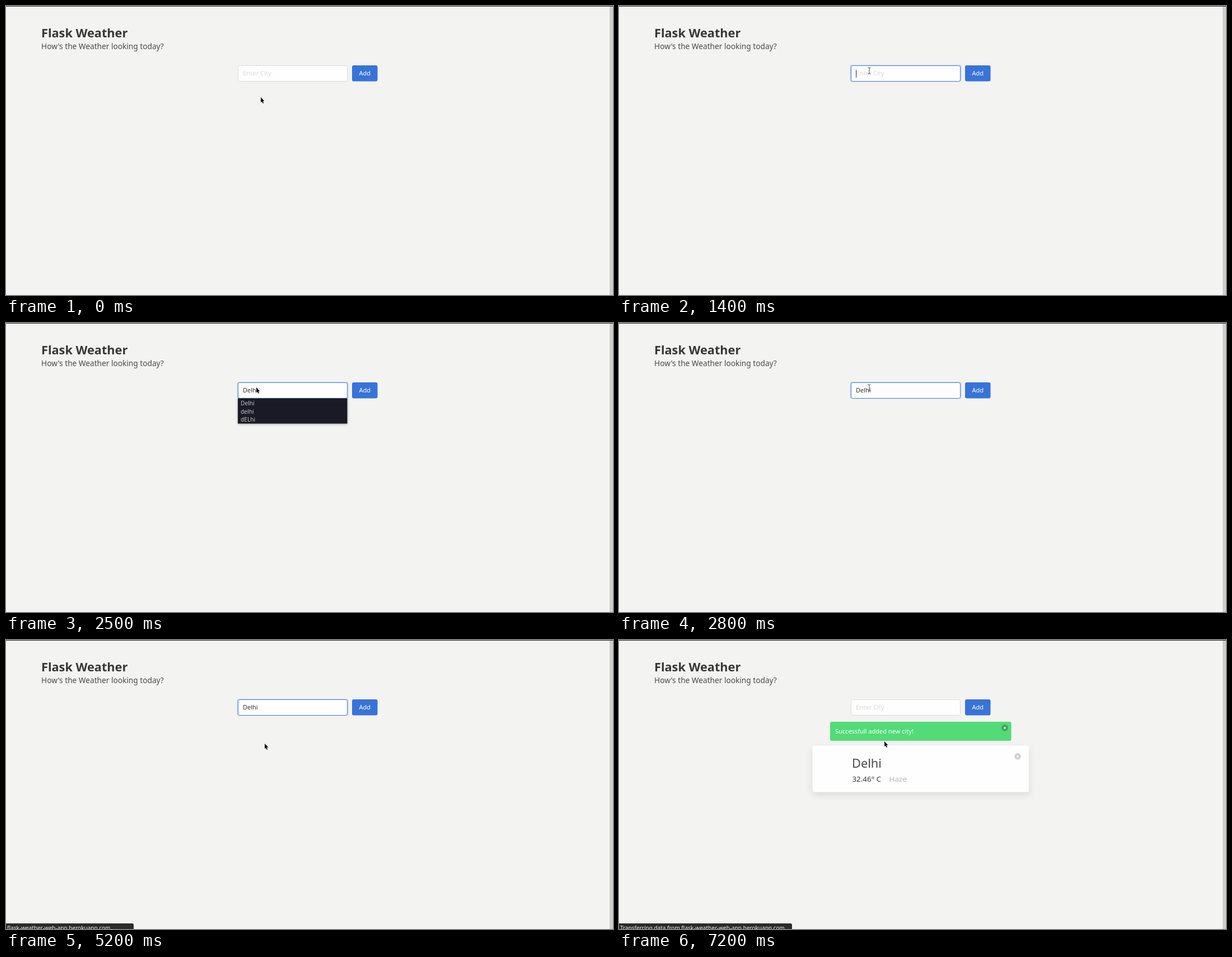
Recreate the animation shown at these times as an HTML page. Size 1084x516 px, loop 8 s.

```html
<!DOCTYPE html>
<html lang="en">
<head>
<meta charset="utf-8">
<title>Flask Weather</title>
<style>
  html, body { margin: 0; width: 100%; height: 100%; overflow: hidden; background: #f3f3f1; }
  svg { display: block; width: 100%; height: 100%; font: 11px "Noto Sans", "Open Sans", sans-serif; fill: #363636; }
  .muted { fill: #dadada; }
  .light { fill: #fff; }
  #menu { filter: drop-shadow(0 1px 2px rgba(0, 0, 0, .3)); }
  #menu text { font-size: 10.2px; fill: #c3c4c9; }
  #card { filter: drop-shadow(0 5px 6px rgba(10, 10, 10, .1)); }
  #status text { font-size: 10px; fill: #eee; }
</style>
</head>
<body>
<svg viewBox="0 0 1084 516">
  <defs>
    <g id="close">
      <circle r="5.7"/>
      <path d="M-1.9-1.9 1.9 1.9M1.9-1.9-1.9 1.9" stroke="#fff" stroke-width="1.3"/>
    </g>
  </defs>
  <rect width="1084" height="516" fill="#f3f3f1"/>
  <rect x="1078" width="6" height="516" fill="#cdcdcc"/>
  <rect width="1084" height="1" fill="#222"/>

  <text x="63" y="56" font-size="21.7" font-weight="700">Flask Weather</text>
  <text x="63" y="77" font-size="13.68" fill="#4a4a4a">How's the Weather looking today?</text>

  <rect id="ring" x="412.5" y="105" width="199" height="30.5" rx="4" fill="#3273dc" fill-opacity=".25"/>
  <rect id="field" x="414.5" y="106.5" width="195" height="28" rx="3" fill="#fefefe"/>
  <text id="hint" class="muted" x="423" y="124.3" font-size="11.2">Enter City</text>
  <text id="typed" x="423" y="124.3"></text>
  <rect id="caret" y="114" width="1" height="14"/>
  <rect x="618" y="106" width="45.5" height="28.5" rx="3" fill="#3873d7"/>
  <text class="light" x="630.5" y="124.3">Add</text>

  <g id="menu">
    <rect id="panel" x="414" y="134.5" width="195.5" fill="#191a25"/>
    <g id="items"></g>
  </g>

  <g id="result">
    <rect x="377" y="146" width="323.5" height="34" rx="3" fill="#52db76"/>
    <text class="light" x="386" y="167">Successfull added new city!</text>
    <use href="#close" x="689" y="157" fill="#3d9c57"/>
    <rect id="card" x="345.5" y="188.5" width="386.5" height="83" rx="4" fill="#fefefe"/>
    <use href="#close" x="712" y="208" fill="#cecece"/>
    <text x="416" y="228" font-size="21.8" fill="#4a4a4a">Delhi</text>
    <text x="416.5" y="252.5" font-size="13.3">32.46° C</text>
    <text x="482.5" y="252.5" font-size="13.4" fill="#b5b5b5">Haze</text>
  </g>

  <g id="status">
    <rect id="bar" x="-4" y="506" height="20" rx="3" fill="#2b2b2b"/>
    <text id="message" x="2" y="518"></text>
  </g>

  <path id="arrow" d="M0 0V9.3L2 7.6 3.6 11 5.2 10.3 3.8 7 6.3 6.6Z" fill="#111"/>
  <path id="beam" d="M-2.5-5H-.7L0-4.3.7-5H2.5M0-4.3V5.3M-2.5 6H-.7L0 5.3.7 6H2.5" fill="none" stroke="#444"/>
</svg>
<script>
const LOOP = 8000;
const CITY = "Delhi";
const HOST = "flask-weather-web-app.herokuapp.com";
const HISTORY = ["Delhi", "delhi", "dELhi", "Dlehi", "Mumbai", "Paris"];
// Pointer path: time, x, y
const PATH = [
  [0, 455, 163], [900, 455, 163], [1200, 447, 115], [3300, 447, 115], [3500, 441, 122],
  [3900, 459, 188], [4400, 459, 188], [4600, 459, 186], [5100, 459, 186], [5600, 474, 181], [LOOP, 474, 181]
];

const $ = id => document.getElementById(id);
const show = (id, on) => $(id).setAttribute("visibility", on ? "visible" : "hidden");
const set = (id, attributes) => {
  for (const name in attributes) $(id).setAttribute(name, attributes[name]);
};

function pointerAt(t) {
  const i = PATH.findIndex(p => p[0] > t);
  const [t0, x0, y0] = PATH[i - 1], [t1, x1, y1] = PATH[i];
  const k = (t - t0) / (t1 - t0);
  return [Math.round(x0 + (x1 - x0) * k), Math.round(y0 + (y1 - y0) * k)];
}

function drawMenu(t, typed) {
  const open = t >= 1500 && t < 2700;
  const rows = HISTORY.filter(name => name.toLowerCase().includes(typed.toLowerCase()));
  show("menu", open);
  set("panel", { height: 2.5 + rows.length * 14.2 });
  $("items").innerHTML = rows.map((name, i) =>
    `<text x="419" y="${147.3 + i * 14.2}">${name}</text>`).join("");
}

function draw(t) {
  const loaded = t >= 7200;
  const focused = t >= 1400 && !loaded;
  const hovered = t >= 1200 && t < 1400;
  const count = t < 1800 || loaded ? 0 : t < 2000 ? 1 : Math.min(5, (t - 2000) / 100 + 2);
  const typed = CITY.slice(0, count);

  show("ring", focused);
  set("field", { stroke: focused ? "#4f82cb" : hovered ? "#b8b8b8" : "#dbdbdb" });
  show("hint", !count);
  $("typed").textContent = typed;
  const blinkOn = t < 2500 || Math.floor((t - 2500) / 1230) % 2;
  show("caret", focused && blinkOn);
  set("caret", { x: Math.floor(423 + $("typed").getComputedTextLength()) });
  drawMenu(t, typed);
  show("result", loaded);

  const transferring = t >= 7100;
  show("status", t >= 2900);
  set("bar", { width: transferring ? 313 : 232 });
  $("message").textContent = (transferring ? "Transferring data from " : "") + HOST;

  const overText = t >= 1200 && t < 1500 || t >= 2800 && t < 3600;
  const [x, y] = pointerAt(t);
  show("beam", overText);
  show("arrow", !overText);
  set("beam", { transform: `translate(${x} ${y})` });
  set("arrow", { transform: `translate(${x} ${y})` });
}

let last = -1;
function tick() {
  const t = Math.floor(performance.now() % LOOP / 100) * 100;
  if (t !== last) draw(last = t);
  requestAnimationFrame(tick);
}
tick();
</script>
</body>
</html>
```
